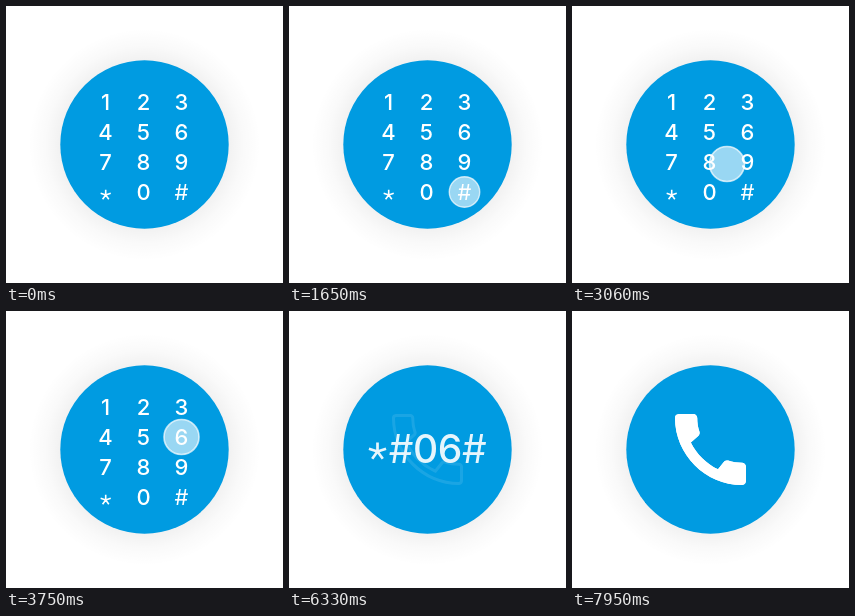
Write an HTML page that moves like this. It is 277 px wide and 277 px high and loops after 8.4 s.

```html
<!DOCTYPE html>
<html lang="en">
<head>
<meta charset="utf-8">
<title>Dial code</title>
<style>
  html, body { margin: 0; width: 100%; height: 100%; overflow: hidden; background: #fff; }
  svg { display: block; width: 100vw; height: 100vh; }
  text { font-family: Inter, "Liberation Sans", sans-serif; font-weight: 500; fill: #fff; text-anchor: middle; }
  .hash { font-weight: 400; }
</style>
</head>
<body>
<svg viewBox="0 0 277 277">
  <defs>
    <radialGradient id="shadow">
      <stop offset=".7" stop-color="#000" stop-opacity=".06"/>
      <stop offset=".85" stop-color="#000" stop-opacity=".022"/>
      <stop offset="1" stop-color="#000" stop-opacity="0"/>
    </radialGradient>
    <path id="handset" d="M20.01 15.38c-1.23 0-2.42-.2-3.53-.56-.35-.12-.74-.03-1.01.24l-1.57 1.97c-2.83-1.35-5.48-3.9-6.89-6.83l1.95-1.66c.27-.28.35-.67.24-1.02-.37-1.11-.56-2.3-.56-3.53 0-.54-.45-.99-.99-.99H4.19C3.65 3 3 3.24 3 3.99 3 13.28 10.73 21 20.01 21c.71 0 .99-.63.99-1.18v-3.45c0-.54-.45-.99-.99-.99z"/>
    <clipPath id="inside"><use href="#handset"/></clipPath>
  </defs>
  <circle cx="138.5" cy="138.5" r="116" fill="url(#shadow)"/>
  <circle cx="138.5" cy="138.5" r="84.2" fill="#009be1"/>
  <g id="keypad"></g>
  <circle id="touch" r="17.5" fill="#fff" fill-opacity=".6" stroke="#fff" stroke-opacity=".7" stroke-width="1.6"/>
  <g id="code"></g>
  <g id="phone" transform="translate(91.17 91.17) scale(3.944)" fill="#fff">
    <use href="#handset" clip-path="url(#inside)" fill="none" stroke="#fff" stroke-width="1.52"/>
    <use id="fill" href="#handset"/>
  </g>
</svg>
<script>
const LOOP = 8400, STEP = 30;
const $ = id => document.getElementById(id);
const columns = [99.5, 137.5, 175.5];

function asterisk(x, y, r, weight) {
  let d = "";
  for (let i = 0; i < 5; i++) {
    const a = (i * 72 - 90) * Math.PI / 180;
    d += `M${x} ${y}l${r * Math.cos(a)} ${r * Math.sin(a)}`;
  }
  return `<path d="${d}" fill="none" stroke="#fff" stroke-width="${weight}"/>`;
}

const glyph = (char, x, y, size) =>
  `<text x="${x}" y="${y}" font-size="${size}"${char === "#" ? ' class="hash"' : ""}>${char}</text>`;

$("keypad").innerHTML = asterisk(99.7, 189, 5.3, 1.6) +
  [..."123456789 0#"].map((char, i) =>
    char === " " ? "" : glyph(char, columns[i % 3], 104 + 30 * Math.floor(i / 3), 22)).join("");

$("code").innerHTML = asterisk(88.5, 140.5, 9, 2.7) +
  [..."#06#"].map((char, i) => glyph(char, 112.2 + 24.4 * i, 151.5, 39)).join("");

// Pressed keys: centre, move start and press start (each press lasts 300 ms)
const keys = [
  { x: 99.5, y: 186, move: 450, press: 450 },
  { x: 175.5, y: 186, move: 900, press: 1500 },
  { x: 137, y: 186, move: 1950, press: 2400 },
  { x: 175.5, y: 126, move: 2850, press: 3450 },
  { x: 175.5, y: 186, move: 3900, press: 4500 }
];

const ramp = (t, start, end) =>
  end > start ? Math.min(1, Math.max(0, (t - start) / (end - start))) : +(t >= start);
const mix = (a, b, p) => a + (b - a) * p;

function draw(t) {
  let { x, y } = keys[0], scale = 1;
  for (const key of keys) {
    const p = ramp(t, key.move, key.press - 150);
    x = mix(x, key.x, p);
    y = mix(y, key.y, p);
    scale -= 0.13 * (1 - Math.abs(2 * ramp(t, key.press, key.press + 300) - 1));
  }
  const toCode = ramp(t, 4950, 5400), toPhone = ramp(t, 6300, 6600);
  $("touch").setAttribute("transform", `translate(${x} ${y}) scale(${scale})`);
  $("touch").setAttribute("opacity", t < 450 ? 0 : 1 - toCode);
  $("keypad").setAttribute("opacity", 1 - toCode);
  $("code").setAttribute("opacity", toCode * (1 - toPhone));
  $("phone").setAttribute("opacity", toPhone);
  $("fill").setAttribute("opacity",
    ramp(t, 6900, 6900) - ramp(t, 7080, 7380) + ramp(t, 7800, 7950));
}

const start = performance.now();
function tick() {
  const t = Math.max(0, performance.now() - start) % LOOP;
  draw(Math.floor(t / STEP) * STEP);
  requestAnimationFrame(tick);
}
tick();
</script>
</body>
</html>
```
